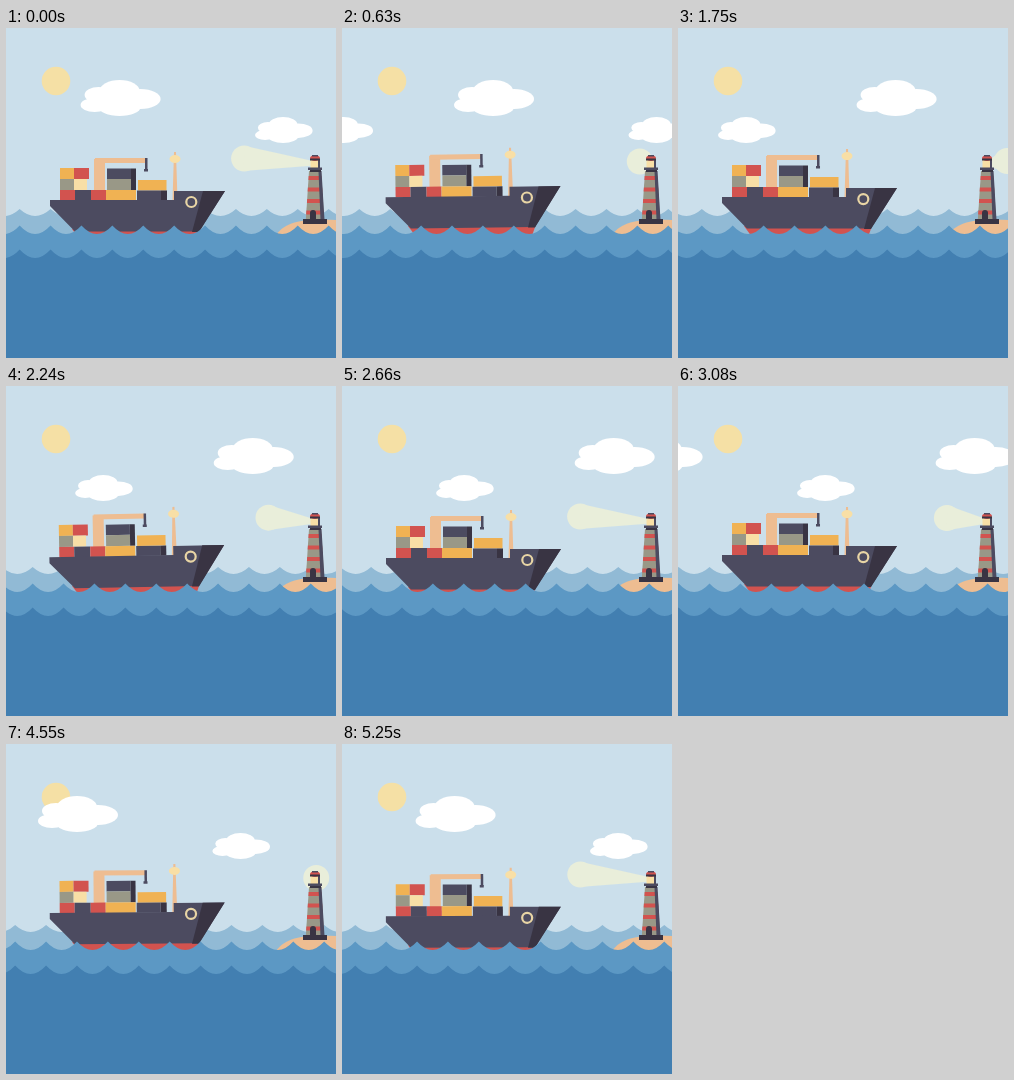
An HTML page with a canvas that plays this animation: 330 px wide and 330 px high, repeating every 5.32 s.

```html
<!DOCTYPE html>
<html lang="en">
<head>
<meta charset="utf-8">
<title>Cargo ship and lighthouse</title>
<style>
html, body { margin: 0; width: 100%; height: 100%; overflow: hidden; background: #cbdfeb; }
canvas { display: block; width: 330px; height: 330px; }
</style>
</head>
<body>
<canvas id="stage" width="330" height="330"></canvas>
<script>
const ctx = document.getElementById('stage').getContext('2d');
const LOOP = 5320, STEP = 70, TAU = Math.PI * 2;
const SPAN = 313, WAVE = 30.9;
const C = {
  sky: '#cbdfeb', sun: '#f5e0a5', back: '#91bad5', mid: '#5c98c4', front: '#427fb1',
  navy: '#4c4b60', dark: '#393443', red: '#d2534f', orange: '#f0b253',
  grey: '#999887', cream: '#f8dfa6', peach: '#eebd91', beam: '#e9eeda'
};
const mod = (a, n) => ((a % n) + n) % n;

function rect(color, x, y, w, h) {
  ctx.fillStyle = color;
  ctx.fillRect(x, y, w, h);
}

function poly(color, ...p) {
  ctx.fillStyle = color;
  ctx.beginPath();
  for (let i = 0; i < p.length; i += 2) ctx.lineTo(p[i], p[i + 1]);
  ctx.fill();
}

function oval(color, x, y, rx, ry = rx) {
  ctx.fillStyle = color;
  ctx.beginPath();
  ctx.ellipse(x, y, rx, ry, 0, 0, TAU);
  ctx.fill();
}

// Clouds repeat every SPAN pixels.
function cloud(x, y, scale) {
  for (let left = mod(x, SPAN) - SPAN; left < 330; left += SPAN) {
    ctx.save();
    ctx.translate(left, y);
    ctx.scale(scale, scale);
    oval('#fff', 39, 11, 20, 11);
    oval('#fff', 18, 15, 14, 8);
    oval('#fff', 60, 19, 20, 10);
    oval('#fff', 14, 25, 14, 7);
    oval('#fff', 39, 27, 21, 9);
    oval('#fff', 38, 19, 26, 10);
    ctx.restore();
  }
}

// Scalloped water: round troughs meeting in pointed crests.
function water(color, crest, depth, trough) {
  ctx.fillStyle = color;
  ctx.beginPath();
  let x = mod(trough - WAVE / 2, WAVE) - WAVE;
  ctx.moveTo(x, 330);
  ctx.lineTo(x, crest);
  for (; x < 330; x += WAVE)
    ctx.quadraticCurveTo(x + WAVE / 2, crest + depth * 2, x + WAVE, crest);
  ctx.lineTo(x, 330);
  ctx.fill();
}

function beam(p) {
  const x0 = 309, y0 = 135.5, r = 13;
  const x = 299 - 61 * Math.cos(TAU * (2 * p + 0.01));
  const y = 134 - Math.abs(x - x0) * 0.05;
  const dx = x - x0, dy = y - y0, d = Math.hypot(dx, dy);
  oval(C.beam, x, y, r);
  if (d > r) {
    const nx = -dy / d, ny = dx / d;
    poly(C.beam, x0 + nx * 2, y0 + ny * 2, x + nx * 12.5, y + ny * 12.5,
      x - nx * 12.5, y - ny * 12.5, x0 - nx * 2, y0 - ny * 2);
  }
}

function lighthouse() {
  ctx.fillStyle = C.peach;
  ctx.beginPath();
  ctx.moveTo(268, 210);
  ctx.bezierCurveTo(278, 194, 292, 191, 330, 192);
  ctx.lineTo(330, 212);
  ctx.lineTo(268, 212);
  ctx.fill();

  const edge = (y, side) => 309 + side * (6 + (y - 143) * 0.065);
  const band = (color, y, h) => poly(color, edge(y, -1), y, edge(y, 1), y,
    edge(y + h, 1), y + h, edge(y + h, -1), y + h);
  band(C.grey, 143, 49);
  for (let y = 148; y < 190; y += 11.5) band(C.red, y, 4);
  poly(C.navy, 312.5, 143, 315.5, 143, 318.5, 192, 314.5, 192);
  rect(C.dark, 297, 191, 24, 5);
  oval(C.dark, 307, 185, 3);
  rect(C.dark, 304, 185, 6, 7);
  rect(C.cream, 304.5, 132, 9, 8);
  rect(C.navy, 312, 132, 2, 8);
  rect(C.navy, 302, 139.5, 14, 2.5);
  rect(C.dark, 304, 142, 11, 2);
  oval(C.red, 309, 130, 5, 3);
  rect(C.dark, 304, 130.5, 10, 2);
  rect(C.navy, 306, 127, 6, 1.5);
}

function cargo() {
  rect(C.orange, 54, 140, 14, 11);
  rect(C.red, 68, 140, 15, 11);
  rect(C.grey, 54, 151, 14, 11);
  rect(C.cream, 68, 151, 13, 11);
  rect(C.red, 54, 162, 15, 10.5);
  rect(C.navy, 69, 162, 16, 10.5);

  rect(C.peach, 88, 131, 11, 32);
  rect(C.peach, 89, 130, 51, 5);
  rect(C.navy, 139, 130, 2.5, 12);
  rect(C.navy, 138, 141, 4, 2.5);
  rect(C.red, 85, 162, 15, 10.5);

  rect(C.navy, 101, 140.5, 24, 10.5);
  rect(C.grey, 101, 151, 24, 11);
  rect(C.dark, 125, 140.5, 5, 21.5);
  rect(C.orange, 100, 162, 30, 10.5);
  rect(C.orange, 132, 152, 28.5, 10.5);
  rect(C.navy, 131, 162.5, 24, 10);
  rect(C.dark, 155, 162.5, 6, 10);

  poly(C.peach, 168, 124, 170, 124, 171.5, 173, 166.5, 173);
  oval(C.cream, 169, 131, 5.5, 4);
}

function ship(p) {
  const cycle = 4 * p;
  const stern = 1.8 * Math.cos(TAU * (cycle - 0.88)) - 1.3;
  const bow = 2.6 * Math.cos(TAU * (cycle - 0.04)) - 2.5;
  const angle = Math.atan((bow - stern) / 175);
  ctx.save();
  ctx.translate(131, 205 + (stern + bow) / 2);
  ctx.rotate(angle);
  ctx.translate(-131, -205);
  cargo();
  poly(C.red, 66, 201, 194, 201, 190, 212, 74, 212);
  poly(C.navy, 44, 172, 168, 172, 168, 163, 219, 163, 193, 203.5, 69, 203.5, 44, 178);
  poly(C.dark, 197, 163, 219, 163, 193, 204, 186, 204);
  ctx.strokeStyle = '#e8d5a5';
  ctx.lineWidth = 2.2;
  ctx.beginPath();
  ctx.arc(185.3, 174, 5, 0, TAU);
  ctx.stroke();
  ctx.restore();
}

function draw(time) {
  const t = Math.floor((time % LOOP) / STEP) * STEP;
  const p = t / LOOP;
  const drift = t * 312 / 5250;
  const trough = 60 + p * WAVE;
  rect(C.sky, 0, 0, 330, 330);
  oval(C.sun, 50, 53, 14.3);
  cloud(74.6 + drift, 52, 1);
  cloud(249 + drift, 89, 0.72);
  water(C.back, 181, 7, trough);
  beam(p);
  lighthouse();
  ship(p);
  water(C.mid, 197.5, 8.5, trough);
  water(C.front, 221.5, 8.5, trough);
}

function tick() {
  draw(performance.now());
  requestAnimationFrame(tick);
}
tick();
</script>
</body>
</html>
```
